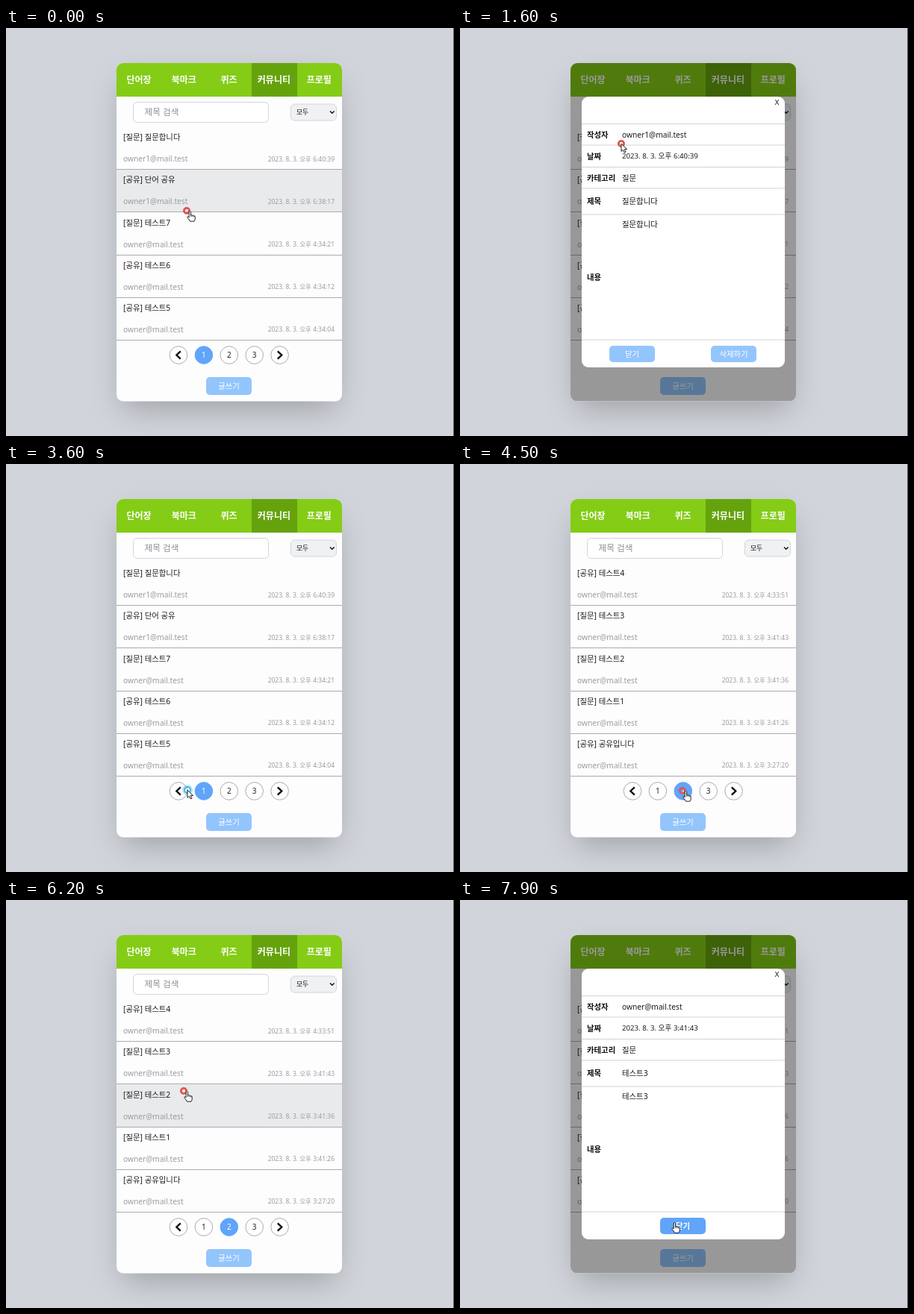
Recreate the animation shown at these times as an HTML page with a canvas. Size 600 px wide and 547 px high, loop 8000 ms.

```html
<!DOCTYPE html>
<html lang="ko">
<head>
<meta charset="utf-8">
<title>커뮤니티</title>
<style>
html, body { margin: 0; width: 100%; height: 100%; overflow: hidden; background: #d1d5db; }
canvas { display: block; width: 600px; height: 547px; }
</style>
</head>
<body>
<canvas id="stage"></canvas>
<script>
const W = 600, H = 547, LOOP = 8000;
const canvas = document.getElementById('stage');
const ctx = canvas.getContext('2d');
const ratio = window.devicePixelRatio || 1;
canvas.width = W * ratio;
canvas.height = H * ratio;

const FAMILY = '"Noto Sans", "Noto Sans CJK KR", sans-serif';
const BLUE = '#60a5fa', PALE_BLUE = '#93c5fd', LINE = '#a8abb1', PALE_LINE = '#d1d3d8';
const OWNER = 'owner1@mail.test', OTHER = 'owner@mail.test';

const post = (kind, title, author, time) => ({ kind, title, author, date: `2023. 8. 3. 오후 ${time}` });
const pages = [
  [
    post('질문', '질문합니다', OWNER, '6:40:39'),
    post('공유', '단어 공유', OWNER, '6:38:17'),
    post('질문', '테스트7', OTHER, '4:34:21'),
    post('공유', '테스트6', OTHER, '4:34:12'),
    post('공유', '테스트5', OTHER, '4:34:04')
  ],
  [
    post('공유', '테스트4', OTHER, '4:33:51'),
    post('질문', '테스트3', OTHER, '3:41:43'),
    post('질문', '테스트2', OTHER, '3:41:36'),
    post('질문', '테스트1', OTHER, '3:41:26'),
    post('공유', '공유입니다', OTHER, '3:27:20')
  ]
];
const OPEN_FIRST = 1400, CLOSE_FIRST = 3500, NEXT_PAGE = 4500, OPEN_SECOND = 6900;

// Pointer waypoints: time, x, y
const path = [
  [0, 242, 245], [400, 216, 155], [800, 216, 155], [900, 217, 154], [1100, 216, 155],
  [1900, 216, 155], [2600, 263, 215], [2700, 250, 362], [3300, 243, 437], [3600, 243, 437],
  [4300, 298, 438], [4800, 298, 438], [5200, 305, 440], [5500, 323, 439], [5700, 321, 439],
  [5800, 321, 439], [6200, 238, 256], [6600, 240, 222], [7000, 240, 222], [7600, 266, 427],
  [7800, 283, 432], [8000, 283, 432]
];

function pointerAt(t) {
  const i = path.findIndex(p => p[0] > t);
  const [t0, x0, y0] = path[i - 1], [t1, x1, y1] = path[i];
  const k = (t - t0) / (t1 - t0);
  return { x: x0 + (x1 - x0) * k, y: y0 + (y1 - y0) * k };
}

const inside = (p, x, y, w, h) => p.x >= x && p.x < x + w && p.y >= y && p.y < y + h;

function text(str, x, y, size, color = '#1c1c1e', align = 'left', weight = 400) {
  ctx.font = `${weight} ${size}px ${FAMILY}`;
  ctx.fillStyle = color;
  ctx.textAlign = align;
  ctx.fillText(str, x, y + size * 0.36);
}

function box(x, y, w, h, r, fill, stroke) {
  ctx.beginPath();
  ctx.roundRect(x, y, w, h, r);
  if (fill) { ctx.fillStyle = fill; ctx.fill(); }
  if (stroke) { ctx.strokeStyle = stroke; ctx.lineWidth = 1; ctx.stroke(); }
}

function rect(x, y, w, h, fill) {
  ctx.fillStyle = fill;
  ctx.fillRect(x, y, w, h);
}

function polyline(points, width, color) {
  ctx.beginPath();
  points.forEach(([x, y]) => ctx.lineTo(x, y));
  ctx.lineWidth = width;
  ctx.strokeStyle = color;
  ctx.stroke();
}

function button(label, x, y, h, pointer) {
  const hot = pointer && inside(pointer, x, y, 61, h);
  box(x, y, 61, h, 5, hot ? BLUE : PALE_BLUE);
  text(label, x + 30.5, y + h / 2, 10.4, '#fff', 'center', hot ? 700 : 400);
  return hot;
}

function drawBackdrop() {
  rect(0, 0, W, H, '#d1d5db');
  ctx.save();
  ctx.shadowColor = 'rgba(0,0,0,.25)';
  ctx.shadowBlur = 42 * ratio;
  ctx.shadowOffsetY = 18 * ratio;
  box(156, 55, 286, 437, 9, '#777');
  ctx.restore();
  rect(599, 0, 1, H, '#55575a');
}

function drawHeader() {
  rect(148, 47, 302, 45, '#84cc16');
  rect(329, 47, 61, 45, '#65a30d');
  ['단어장', '북마크', '퀴즈', '커뮤니티', '프로필'].forEach((label, i) =>
    text(label, 178 + i * 60.3, 69.5, 12, '#fff', 'center', 700));
}

function drawFilters() {
  box(170.5, 99.5, 181, 27, 5, '#fff', '#d1d5db');
  text('제목 검색', 185.5, 113, 11.7, '#8e9196');
  box(381.5, 102, 61, 22, 5, '#f0f1f3', '#d1d5db');
  text('모두', 389, 113, 8.8, '#111');
  polyline([[434, 111.5], [436.8, 114.3], [439.6, 111.5]], 1.5, '#111');
}

function drawRows(posts, pointer) {
  let hot = false;
  posts.forEach((item, i) => {
    const top = 132.5 + i * 57.2;
    const bottom = Math.round(top + 56.7);
    if (pointer && inside(pointer, 148, top, 302, 57.2)) {
      rect(148, Math.round(top), 302, bottom - Math.round(top), '#e9eaec');
      hot = true;
    }
    text(`[${item.kind}] ${item.title}`, 157, top + 14, 10.4);
    text(item.author, 157, top + 43, 10.2, '#9a9ca2');
    text(item.date, 440, top + 43, 8.5, '#9a9ca2', 'right');
    rect(148, bottom, 302, 1, LINE);
  });
  return hot;
}

function drawPager(page, pointer) {
  let hot = false;
  for (let i = 0; i < 5; i++) {
    const x = 231 + i * 33.9, y = 438.5;
    const over = pointer && Math.hypot(pointer.x - x, pointer.y - y) < 12;
    const arrow = i === 0 || i === 4;
    const lit = over || i === page + 1;
    hot = hot || over;
    box(x - 11.8, y - 11.8, 23.6, 23.6, 11.8, lit ? BLUE : '#fff', lit ? BLUE : LINE);
    if (arrow) {
      const d = i ? 1 : -1;
      polyline([[x - 2.8 * d, y - 5.2], [x + 2.6 * d, y], [x - 2.8 * d, y + 5.2]], 2.4, '#111');
    } else {
      text(String(i), x, y, 10, lit ? '#fff' : '#222', 'center');
    }
  }
  return hot;
}

function drawDialog(item, pointer) {
  rect(148, 47, 302, 453.5, 'rgba(0,0,0,.4)');
  box(163, 92, 272, 363, 9, '#fff');
  text('X', 424.5, 99.5, 9.5, '#111', 'center');
  [128, 156.5, 186, 214.5, 249.5, 417.5].forEach(y => rect(163, y, 272, 1, PALE_LINE));
  [['작성자', 143], ['날짜', 172], ['카테고리', 201], ['제목', 232.5], ['내용', 334]].forEach(([label, y]) =>
    text(label, 170, y, 10.4, '#111', 'left', 700));
  text(item.author, 217, 143, 10.2);
  text(item.date, 217, 172, 9.7);
  text(item.kind, 217, 201, 10.4);
  text(item.title, 217, 232.5, 10.4);
  text(item.title, 217, 263, 10.4);
  if (item.author !== OWNER) return button('닫기', 268, 426, 22, pointer);
  const closeHot = button('닫기', 200, 426, 22, pointer);
  return button('삭제하기', 336, 426, 22, pointer) || closeHot;
}

function circle(x, y, r, width, color) {
  ctx.beginPath();
  ctx.arc(x, y, r, 0, Math.PI * 2);
  ctx.lineWidth = width;
  ctx.strokeStyle = color;
  ctx.stroke();
}

const arrowShape = new Path2D('M0 0V10.5L2.5 8.3L4.2 12L6 11.2L4.3 7.6H7.5Z');
const handShape = new Path2D('M3.2 1Q4.8-.4 5.6 1.2V6Q7 5.2 7.7 6.3Q9 5.6 9.6 6.8Q11.2 6.4 11.2 8V11Q11 13 10 14.2H4.4Q3.6 12.2 1.2 9.5Q.2 7.8 1.8 7.6L3.2 8.8Z');

function drawPointer(p, hand, t) {
  const clicked = t >= CLOSE_FIRST && t < CLOSE_FIRST + 200;
  if (clicked) {
    circle(p.x, p.y, 5, 4, 'rgba(125,211,240,.55)');
    circle(p.x, p.y, 4, 2, '#45b5de');
  } else if (t < 7700) {
    circle(p.x, p.y, 3.6, 2.8, '#e4534f');
  }
  ctx.save();
  ctx.translate(p.x, p.y);
  ctx.lineJoin = 'round';
  const shape = hand ? handShape : arrowShape;
  ctx.fillStyle = '#fff';
  ctx.fill(shape);
  ctx.strokeStyle = '#222';
  ctx.lineWidth = 1;
  ctx.stroke(shape);
  if (hand) {
    polyline([[5.6, 6], [5.6, 8]], 0.8, '#222');
    polyline([[7.7, 6.4], [7.7, 8.2]], 0.8, '#222');
    polyline([[9.6, 6.9], [9.6, 8.4]], 0.8, '#222');
  }
  ctx.restore();
}

function draw(t) {
  const pointer = pointerAt(t);
  const page = t < NEXT_PAGE ? 0 : 1;
  const opened = t >= OPEN_FIRST && t < CLOSE_FIRST ? pages[0][0]
    : t >= OPEN_SECOND ? pages[1][1] : null;
  const listPointer = opened ? null : pointer;

  ctx.setTransform(ratio, 0, 0, ratio, 0, 0);
  drawBackdrop();
  ctx.save();
  ctx.beginPath();
  ctx.roundRect(148, 47, 302, 453.5, 9);
  ctx.clip();
  rect(148, 47, 302, 454, '#fefdfe');
  drawHeader();
  drawFilters();
  const rowHot = drawRows(pages[page], listPointer);
  const pageHot = drawPager(page, listPointer);
  const writeHot = button('글쓰기', 268, 468, 24, listPointer);
  const dialogHot = opened && drawDialog(opened, pointer);
  ctx.restore();
  drawPointer(pointer, rowHot || pageHot || writeHot || dialogHot, t);
}

const start = performance.now();
function tick() {
  const t = (performance.now() - start) % LOOP;
  draw(Math.floor(t / 100) * 100);
  requestAnimationFrame(tick);
}
tick();
</script>
</body>
</html>
```
